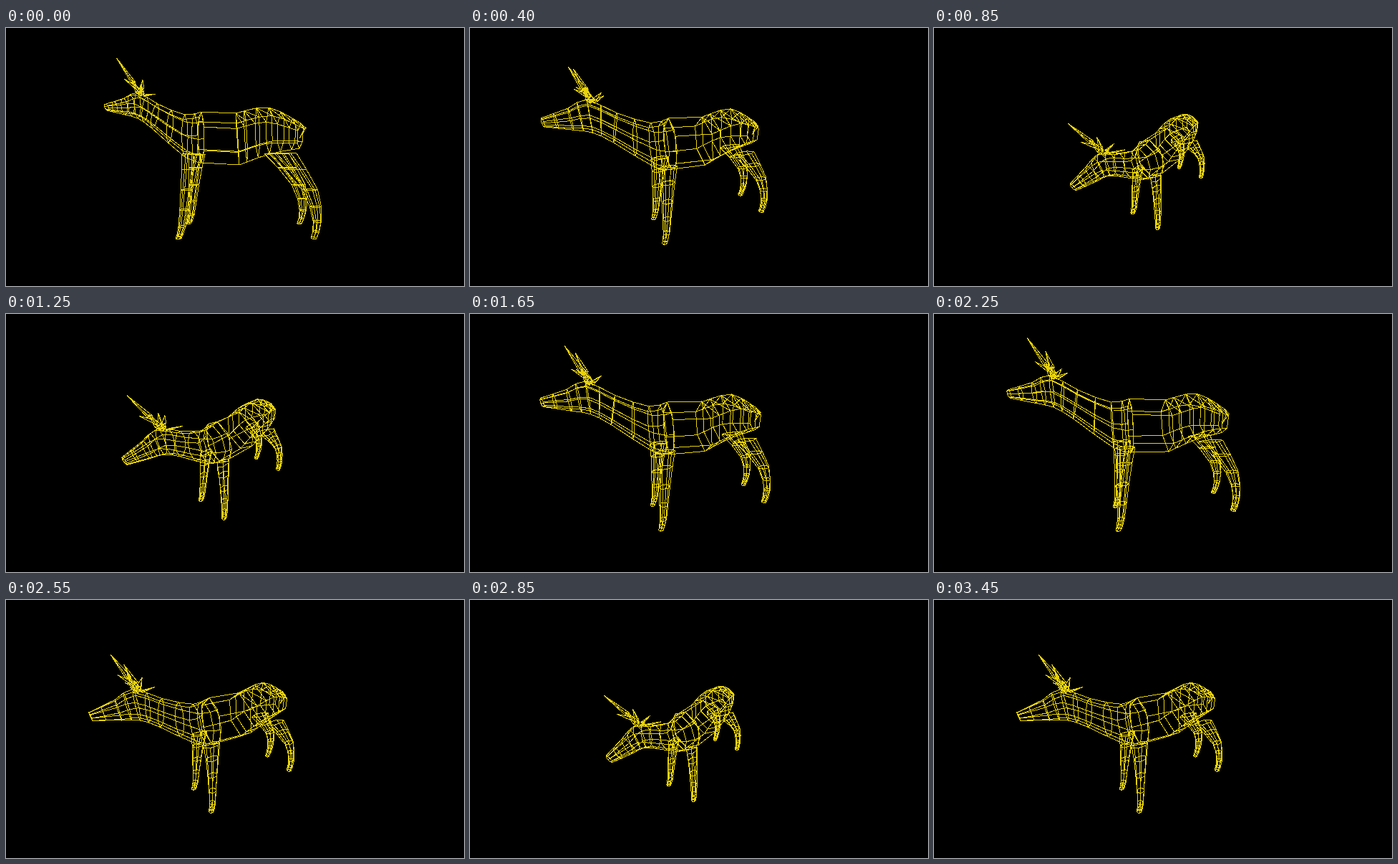
An HTML page that plays this animation: 640x360 px, repeating every 3.5 s.

```html
<!DOCTYPE html>
<html>
<head>
<meta charset="utf-8">
<style>
  html, body { margin: 0; height: 100%; overflow: hidden; background: #000; }
  svg { display: block; }
  path { fill: none; stroke: #e8d20c; stroke-width: 1; shape-rendering: crispEdges; }
</style>
</head>
<body>
<svg width="640" height="360" viewBox="0 0 640 360"><path id="wire"/></svg>
<script>
// Model space: x towards the tail, y down, z towards the viewer.
const lines = [];
const line = (...points) => lines.push(points);

// Catmull-Rom curve through key vectors of any size.
function spline(keys, steps) {
  const key = i => keys[Math.max(0, Math.min(keys.length - 1, i))];
  return Array.from({ length: (keys.length - 1) * steps + 1 }, (_, n) => {
    const i = Math.floor(n / steps), t = n % steps / steps;
    return key(i).map((b, j) => {
      const a = key(i - 1)[j], c = key(i + 1)[j], d = key(i + 2)[j];
      return b + t / 2 * (c - a + t * (2 * a - 5 * b + 4 * c - d + t * (3 * (b - c) + d - a)));
    });
  });
}

// Elliptic cross-section between two points of the silhouette.
function ring([x1, y1, x2, y2, width, z = 0], sides) {
  return Array.from({ length: sides }, (_, i) => {
    const angle = i / sides * 2 * Math.PI, k = (1 - Math.cos(angle)) / 2;
    return [x1 + (x2 - x1) * k, y1 + (y2 - y1) * k, z + width * Math.sin(angle)];
  });
}

function tube(sections, sides) {
  const rings = sections.map(section => ring(section, sides));
  rings.forEach(r => line(...r, r[0]));
  rings[0].forEach((_, i) => line(...rings.map(r => r[i])));
  return rings;
}

// Each section: upper x, y, lower x, y, half width.
const nose = [-180, -74, -179, -65, 5];
const brow = [-155, -82, -154, -59, 9];
const poll = [-136, -90, -136, -54, 10];
const neck = [-108, -74, -116, -40, 11];
const chest = [-70, -59, -70, 0, 19];
const girth = [-47, -63, -47, 8, 28];
const belly = [1, -61, 6, 11, 30];
const croup = [47, -69, 48, -4, 29];
const rump = [92, -47, 90, -12, 14];

tube(spline([nose, brow, poll, neck, chest, girth], 2), 8);
tube([girth, belly], 6);
const haunch = tube(spline([belly, croup, rump], 3), 6);
haunch.slice(1).forEach((r, i) => line(r[1], haunch[i][0], r[5]));
line([92, -47, 0], [98, -40, 3], [90, -26, 0], [98, -40, -3], [92, -47, 0]);

function leg(joints, thickness, side) {
  const centres = spline(joints, 2);
  tube(centres.map(([x, y], i) => {
    const k = i / (centres.length - 1), half = 3.5 + thickness * (1 - k) ** 2;
    return [x - half, y, x + half, y, 7 - 3 * k, side * (19 + 11 * Math.sin(k * Math.PI / 2))];
  }), 6);
}

function spike([x, y, z], tip, half) {
  const front = [x - half, y, z], back = [x + half, y, z], inner = [x, y + half, z * .6];
  line(front, tip, back, front, inner, tip);
  line(inner, back);
}

for (const side of [1, -1]) {
  leg([[-57, -4], [-62, 42], [-67, 88], [-71, 102]], 9, side);
  leg([[62, -5], [96, 42], [104, 81], [99, 102]], 15, side);
  const at = (x, y, z) => [x, y, z * side];
  spike(at(-133, -90, 5), at(-136, -102, 16), 4);
  spike(at(-136, -100, 14), at(-145, -121, 37), 3);
  spike(at(-134, -94, 9), at(-145, -102, 20), 3);
  spike(at(-129, -89, 8), at(-120, -95, 24), 3);
}

const FOCAL = 300, RADIUS = 308, OFFSET = 8;
const wire = document.getElementById("wire");

// The camera circles and rises, always aimed at the origin, dipping in before it backs off.
function camera(swing) {
  const yaw = 1.12 * swing, pitch = Math.atan(.97 * Math.sin(swing));
  const radius = RADIUS * (1 - .15 * swing + .23 * swing * swing);
  const cy = Math.cos(yaw), sy = Math.sin(yaw), cp = Math.cos(pitch), sp = Math.sin(pitch);
  return ([x, y, z]) => {
    z += OFFSET;
    const depth = z * cy - x * sy;
    const scale = FOCAL / (radius / cp - depth * cp + y * sp);
    return [320 + (x * cy + z * sy) * scale, 180 + (y * cp + depth * sp) * scale]
      .map(v => v.toFixed(1)).join();
  };
}

function frame(now) {
  const time = Math.floor(now % 3500 / 50) * .05;
  const project = camera(1 - Math.abs(1 - time % 2));
  wire.setAttribute("d", lines.map(points => "M" + points.map(project).join("L")).join(""));
  requestAnimationFrame(frame);
}
frame(performance.now());
</script>
</body>
</html>
```
